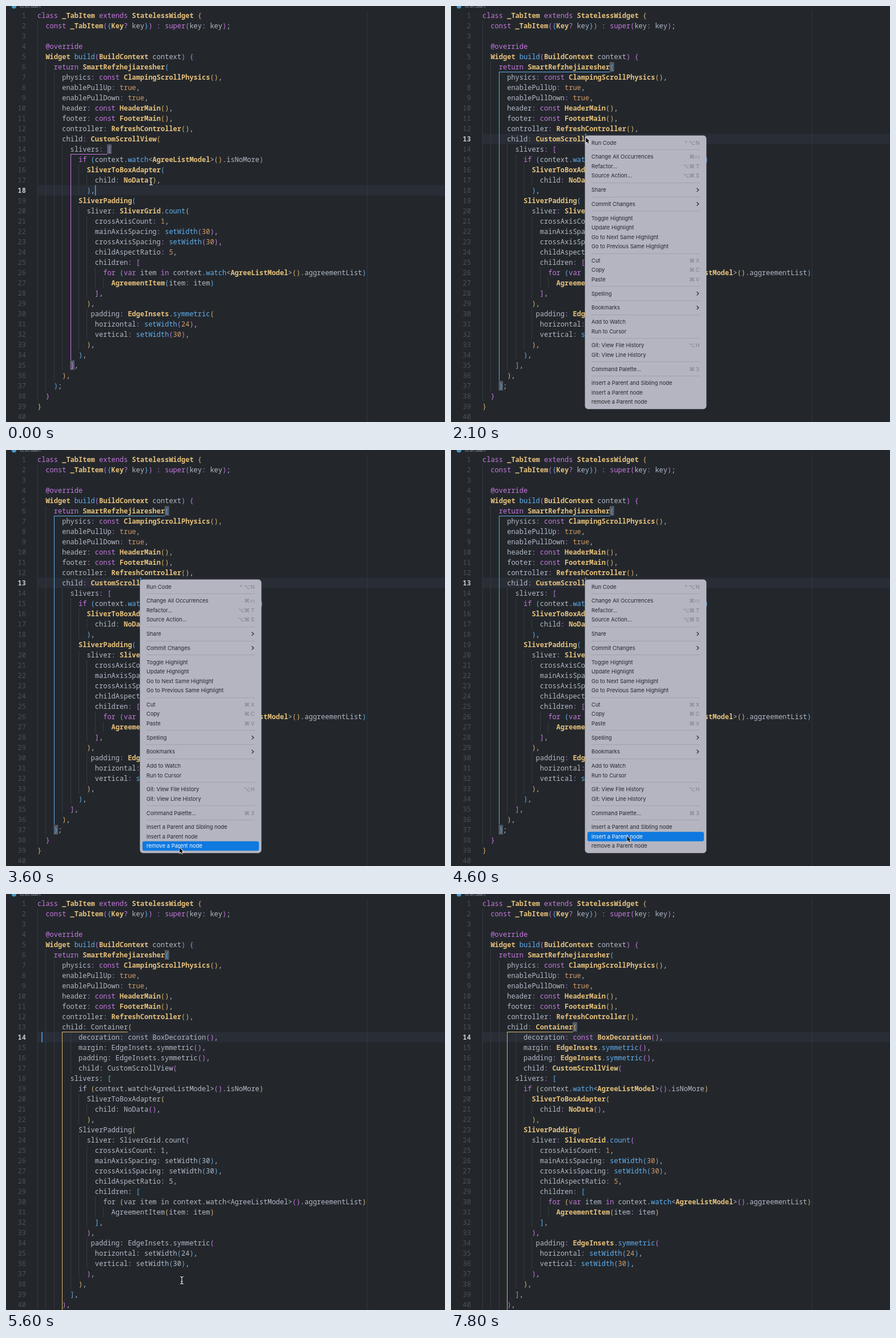
Write an HTML page with a canvas that moves like this. It is 769 px wide and 728 px high and loops after 7900 ms.

```html
<!DOCTYPE html>
<html lang="en">
<head>
<meta charset="utf-8">
<title>Editor</title>
<style>
html, body { margin: 0; width: 100%; height: 100%; overflow: hidden; background: #23272c; }
canvas { display: block; width: 769px; height: 728px; }
</style>
</head>
<body>
<canvas id="stage" width="769" height="728"></canvas>
<script>
const ctx = document.getElementById('stage').getContext('2d');
const W = 769, H = 728, LOOP = 7900;
const LEFT = 55, CHAR = 7.2, ROW = 18, TOP = 7.5;
const MONO = '"Noto Sans Mono", "DejaVu Sans Mono", monospace';
const SANS = 'Inter, "DejaVu Sans", sans-serif';
const COLOR = {
  bg: '#23272c', text: '#b3bac6', type: '#e5c07b', key: '#c678dd', fn: '#61afef',
  num: '#d19a66', guide: '#363b42', line: '#292d35', no: '#4a5059', caret: '#4a9fe8'
};
const PAIRS = ['#dcb268', '#c678dd', '#5fade6'];
const KEYWORDS = 'class extends const super return if for var in @override'.split(' ');

const TIME = { click: 1000, menu: 1900, fade: 5100, insert: 5500, color: 6000 };

const before = `class _TabItem extends StatelessWidget {
  const _TabItem({Key? key}) : super(key: key);

  @override
  Widget build(BuildContext context) {
    return SmartRefzhejiaresher(
      physics: const ClampingScrollPhysics(),
      enablePullUp: true,
      enablePullDown: true,
      header: const HeaderMain(),
      footer: const FooterMain(),
      controller: RefreshController(),
      child: CustomScrollView(
        slivers: [
          if (context.watch<AgreeListModel>().isNoMore)
            SliverToBoxAdapter(
              child: NoData(),
            ),
          SliverPadding(
            sliver: SliverGrid.count(
              crossAxisCount: 1,
              mainAxisSpacing: setWidth(30),
              crossAxisSpacing: setWidth(30),
              childAspectRatio: 5,
              children: [
                for (var item in context.watch<AgreeListModel>().aggreementList)
                  AgreementItem(item: item)
              ],
            ),
             padding: EdgeInsets.symmetric(
              horizontal: setWidth(24),
              vertical: setWidth(30),
            ),
          ),
        ],
      ),
    );
  }
}
`.split('\n');

const wrapper = `      child: Container(
          decoration: const BoxDecoration(),
          margin: EdgeInsets.symmetric(),
          padding: EdgeInsets.symmetric(),
          child: CustomScrollView(`.split('\n');
const after = [...before.slice(0, 12), ...wrapper, ...before.slice(13, 36)];

function wordStyle(word, next) {
  if (KEYWORDS.includes(word)) return 'key';
  if (word === 'true') return 'num';
  if (/^_?[A-Z]/.test(word)) return 'type';
  if (next === '(' || next === '<') return 'fn';
  return 'text';
}

// Splits lines into placed tokens; bracket colour follows nesting depth.
function tokenize(lines) {
  let depth = 0;
  return lines.map(line => {
    const tokens = [];
    for (const m of line.matchAll(/@?[A-Za-z_]\w*|\d+|[^\s\w]/g)) {
      const s = m[0], col = m.index;
      let style = 'text', pair = null;
      if ('([{'.includes(s)) pair = PAIRS[depth++ % 3];
      else if (')]}'.includes(s)) pair = PAIRS[--depth % 3];
      else if (/^\d/.test(s)) style = 'num';
      else if (s === ':' || s === '?') style = 'key';
      else if (/\w/.test(s)) style = wordStyle(s, line[col + s.length]);
      tokens.push({ s, col, style, pair });
    }
    return tokens;
  });
}

const indentOf = line => line.search(/\S/);
const docs = [before, after].map(lines => ({
  tokens: tokenize(lines),
  indents: lines.map((l, i) => l ? indentOf(l) : (i === 2 ? 2 : 0))
}));

const colX = col => LEFT + col * CHAR;
const rowY = n => TOP + (n - 1) * ROW;

function rect(x, y, w, h, color) {
  ctx.fillStyle = color;
  ctx.fillRect(x, y, w, h);
}

function text(s, x, y, color, font, align = 'left') {
  ctx.font = font;
  ctx.fillStyle = color;
  ctx.textAlign = align;
  ctx.fillText(s, x, y);
}

// Caret place, active bracket pair and boxed brackets for a moment.
function editorState(t) {
  const outer = { start: 6, end: 37, col: 4, open: 31, color: PAIRS[2] };
  if (t < TIME.click)
    return { doc: 0, row: 18, col: 14, blink: 0, pair: { start: 14, end: 35, col: 8, open: 17, color: PAIRS[1] } };
  if (t < TIME.menu - 100)
    return { doc: 0, row: 13, col: 29.95, blink: TIME.click, pair: { start: 13, end: 36, col: 6, open: 29, color: PAIRS[0] } };
  if (t < TIME.insert)
    return { doc: 0, row: 13, col: 25, blink: t, pair: outer };
  const pair = { start: 13, end: 42, col: 6, open: 22, color: PAIRS[0] };
  return { doc: 1, row: 14, col: 1, blink: 5300, pair, box: t < TIME.color ? outer : pair };
}

function drawGuides(doc, pair) {
  doc.indents.forEach((n, i) => {
    for (let c = 0; c < n; c += 2) rect(Math.round(colX(c)), rowY(i + 1), 1, ROW, COLOR.guide);
  });
  const x = Math.round(colX(pair.col)), y = Math.round(rowY(pair.start + 1)) - 1;
  rect(x, y, 1, Math.min(H, rowY(pair.end)) - y, pair.color);
  rect(x, y, colX(pair.open) - x, 1, pair.color);
}

function drawBox(row, col) {
  const x = colX(col), y = rowY(row) + 1;
  rect(x, y, CHAR, ROW - 2, '#515967');
  ctx.strokeStyle = '#666c76';
  ctx.lineWidth = 0.6;
  ctx.strokeRect(x + 0.3, y + 0.3, CHAR - 0.6, ROW - 2.6);
}

function drawEditor(t) {
  const st = editorState(t), doc = docs[st.doc], box = st.box || st.pair;
  rect(0, 0, W, H, COLOR.bg);
  ctx.fillStyle = '#4a98c8';
  ctx.beginPath();
  ctx.arc(14, 0.5, 4, 0, 7);
  ctx.fill();
  text('test.dart', 24, 3, '#8d939c', '9.4px ' + SANS);

  rect(LEFT, rowY(st.row), W - LEFT, ROW, COLOR.line);
  rect(632, 8, 1, H, '#32363c');
  drawGuides(doc, st.pair);
  drawBox(box.start, box.open);
  if (!(st.doc && box.end === 37)) drawBox(box.end, box.col);

  for (let n = 1; n <= 40; n++) {
    const y = rowY(n) + 13.3, active = n === st.row;
    text(n, 35, y, active ? '#c3c8d0' : COLOR.no, (active ? '600' : '400') + ' 12px ' + MONO, 'right');
    const plain = st.doc && n >= 13 && t < TIME.color;
    for (const k of doc.tokens[n - 1] || []) {
      const style = plain ? 'text' : k.style;
      text(k.s, colX(k.col), y, k.pair || COLOR[style], (style === 'type' ? '600' : '500') + ' 12px ' + MONO);
    }
  }
  if ((t - st.blink) % 1000 < 500) rect(colX(st.col), rowY(st.row), 1.6, ROW, COLOR.caret);
}

// Each group is divided from the next; "|" precedes the shortcut, ">" opens a submenu.
const groups = [
  ['Run Code|^⌥N'],
  ['Change All Occurrences|⌘F2', 'Refactor...|⌥⌘T', 'Source Action...|⌥⌘S'],
  ['Share|>'],
  ['Commit Changes|>'],
  ['Toggle Highlight', 'Update Highlight', 'Go to Next Same Highlight', 'Go to Previous Same Highlight'],
  ['Cut|⌘X', 'Copy|⌘C', 'Paste|⌘V'],
  ['Spelling|>'],
  ['Bookmarks|>'],
  ['Add to Watch', 'Run to Cursor'],
  ['Git: View File History|⌥H', 'Git: View Line History'],
  ['Command Palette...|⌘3'],
  ['insert a Parent and Sibling node', 'insert a Parent node', 'remove a Parent node']
];

function drawShortcut(keys, y) {
  if (keys === '>') {
    ctx.strokeStyle = '#303138';
    ctx.lineWidth = 1.3;
    ctx.beginPath();
    ctx.moveTo(430.5, y - 3.2);
    ctx.lineTo(433.8, y);
    ctx.lineTo(430.5, y + 3.2);
    ctx.stroke();
    return;
  }
  const parts = keys.match(/F2|./gu).reverse();
  parts.forEach((k, i) => {
    const font = k === 'F2' ? '6.5px ' + SANS : /[⌘⌥]/.test(k) ? '9.5px "DejaVu Sans", sans-serif' : '9.4px ' + SANS;
    text(k, 432 - i * 10, y + 3.4, '#7b7d87', font, 'center');
  });
}

function drawMenu(alpha, mouse) {
  ctx.globalAlpha = alpha;
  ctx.beginPath();
  ctx.roundRect(235, 227, 212, 478, 5);
  ctx.fillStyle = '#b4b5c0';
  ctx.fill();
  ctx.strokeStyle = '#c4c5ce';
  ctx.lineWidth = 0.7;
  ctx.stroke();
  let y = 239.2;
  groups.forEach((items, g) => {
    for (const item of items) {
      const [label, keys] = item.split('|');
      const hover = mouse.y > 650 && Math.abs(mouse.y - y) <= 8.25;
      if (hover) {
        ctx.fillStyle = '#0f79e0';
        ctx.beginPath();
        ctx.roundRect(239, y - 8.2, 204, 16.4, 3);
        ctx.fill();
      }
      text(label, 246, y + 3.4, hover ? '#f4f8ff' : '#26272d', '9.43px ' + SANS);
      if (keys) drawShortcut(keys, y);
      y += 16.5;
    }
    if (g < groups.length - 1) rect(246, Math.round(y - 4.6), 190, 1, '#a1a2ad');
    y += 8.25;
  });
  ctx.globalAlpha = 1;
}

const path = [
  [0, 254, 307], [300, 254, 307], [850, 288, 233], [1050, 288, 233], [1400, 241, 232],
  [1750, 235, 227], [2200, 237, 232], [2900, 290, 527], [3250, 300, 690], [3700, 305, 698],
  [4200, 309, 677], [5400, 309, 677], [5500, 308, 676], [7250, 308, 676], [7650, 312, 745], [7900, 312, 745]
];

function mouseAt(t) {
  let i = 1;
  while (i < path.length - 1 && t > path[i][0]) i++;
  const [t0, x0, y0] = path[i - 1], [t1, x1, y1] = path[i];
  const u = Math.min(1, (t - t0) / (t1 - t0)), e = u * u * (3 - 2 * u);
  return { x: x0 + (x1 - x0) * e, y: y0 + (y1 - y0) * e };
}

function drawBeam({ x, y }) {
  ctx.beginPath();
  for (const s of [-1, 1]) {
    ctx.moveTo(x - 3, y + s * 6.5);
    ctx.quadraticCurveTo(x, y + s * 6.5, x, y + s * 4);
    ctx.quadraticCurveTo(x, y + s * 6.5, x + 3, y + s * 6.5);
  }
  ctx.moveTo(x, y - 5);
  ctx.lineTo(x, y + 5);
  ctx.moveTo(x - 1.8, y + 2);
  ctx.lineTo(x + 1.8, y + 2);
  for (const [w, c] of [[2.8, '#15171a'], [1.2, '#e6e8ea']]) {
    ctx.lineWidth = w;
    ctx.strokeStyle = c;
    ctx.stroke();
  }
}

function drawArrow({ x, y }) {
  ctx.save();
  ctx.translate(x - 0.5, y - 1);
  ctx.beginPath();
  [[0, 0], [0, 9], [2.1, 7.1], [3.6, 10.4], [5.2, 9.7], [3.8, 6.5], [6.6, 6.4]].forEach(p => ctx.lineTo(...p));
  ctx.closePath();
  ctx.lineWidth = 1.6;
  ctx.strokeStyle = '#eeeef2';
  ctx.stroke();
  ctx.fillStyle = '#0b0b0d';
  ctx.fill();
  ctx.restore();
}

function draw(t) {
  const mouse = mouseAt(t);
  drawEditor(t);
  const alpha = t < TIME.menu ? 0 : Math.max(0, Math.min(1, 1 - (t - TIME.fade) / 350));
  if (alpha) drawMenu(alpha, mouse);
  if (alpha) drawArrow(mouse);
  else drawBeam(mouse);
}

function frame() {
  // The picture advances in steps of a tenth of a second.
  draw(Math.floor(performance.now() % LOOP / 100) * 100);
  requestAnimationFrame(frame);
}
frame();
</script>
</body>
</html>
```
